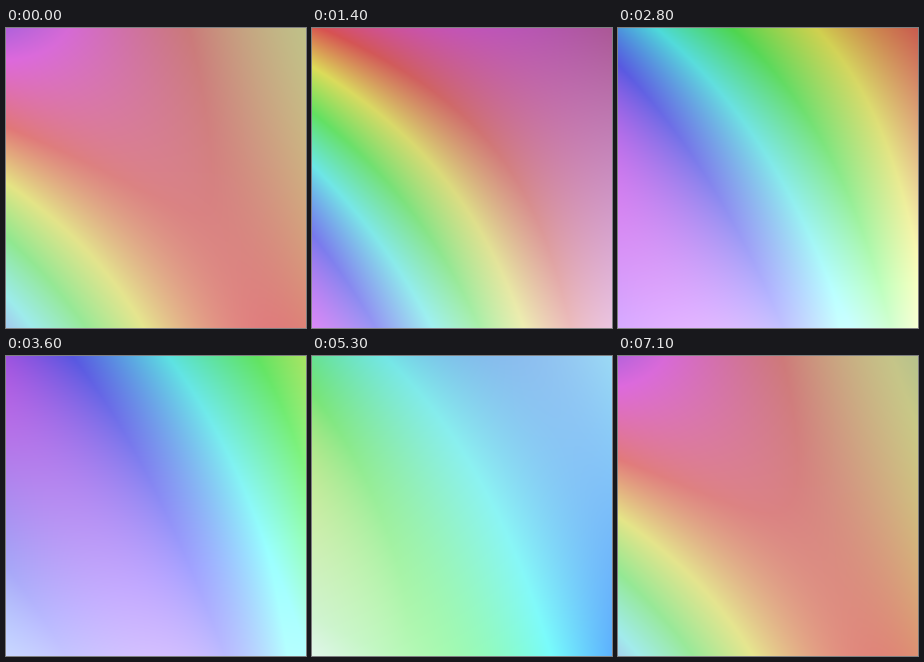
Animation, 300 px wide and 300 px high, one loop 7200 ms. Source, as an HTML page with a canvas:

```html
<!DOCTYPE html>
<html lang="en">
<head>
<meta charset="utf-8">
<title>Drifting colours</title>
<style>
  html, body { margin: 0; height: 100%; overflow: hidden; }
  canvas { display: block; width: 100vw; height: 100vh; }
</style>
</head>
<body>
<canvas width="300" height="300"></canvas>
<script>
const SIZE = 300, LOOP = 7200, STEP = 100;

const ctx = document.querySelector("canvas").getContext("2d");
const image = ctx.createImageData(SIZE, SIZE);
image.data.fill(255);

// Gently twisted surface over u, v in -1..1
const surface = (base, du, dv, twist) => (u, v) => base + du * u + dv * v + twist * u * v;

// The hue swings once per loop, with its own centre, reach and delay at every point
const hueCentre = surface(119, -37, 34, -27);
const hueReach = surface(129, 2, -22, 30);
const hueDelay = surface(196, 53, -31, 16);

// Weakest and strongest colour channel: a mean plus one cosine and one sine wave
const lowMean = surface(135, -1, 31, -15);
const lowCos = surface(-6, 0, -19, -6);
const lowSin = surface(-8, 19, 18, 32);
const highMean = surface(231, -3, 16, 3);
const highCos = surface(-14, -8, -4, 0);
const highSin = surface(-10, -9, 9, 6);

function draw(t) {
  const angle = t / LOOP * 2 * Math.PI;
  const cos = Math.cos(angle), sin = Math.sin(angle);
  let p = 0;
  for (let y = 0; y < SIZE; y++) {
    const v = (2 * y + 1) / SIZE - 1;
    for (let x = 0; x < SIZE; x++, p += 4) {
      const u = (2 * x + 1) / SIZE - 1;
      const delay = hueDelay(u, v) * Math.PI / 180;
      const hue = hueCentre(u, v) + hueReach(u, v) * Math.cos(angle - delay);
      const low = lowMean(u, v) + lowCos(u, v) * cos + lowSin(u, v) * sin;
      const high = highMean(u, v) + highCos(u, v) * cos + highSin(u, v) * sin;
      for (let c = 0; c < 3; c++) {
        const level = Math.abs((hue / 60 + 18 - 2 * c) % 6 - 3) - 1;
        image.data[p + c] = low + (high - low) * Math.min(1, Math.max(0, level));
      }
    }
  }
  ctx.putImageData(image, 0, 0);
}

const start = performance.now();
let shown = -1;
function tick() {
  const t = Math.floor((performance.now() - start) % LOOP / STEP) * STEP;
  if (t !== shown) draw(shown = t);
  requestAnimationFrame(tick);
}
tick();
</script>
</body>
</html>
```
